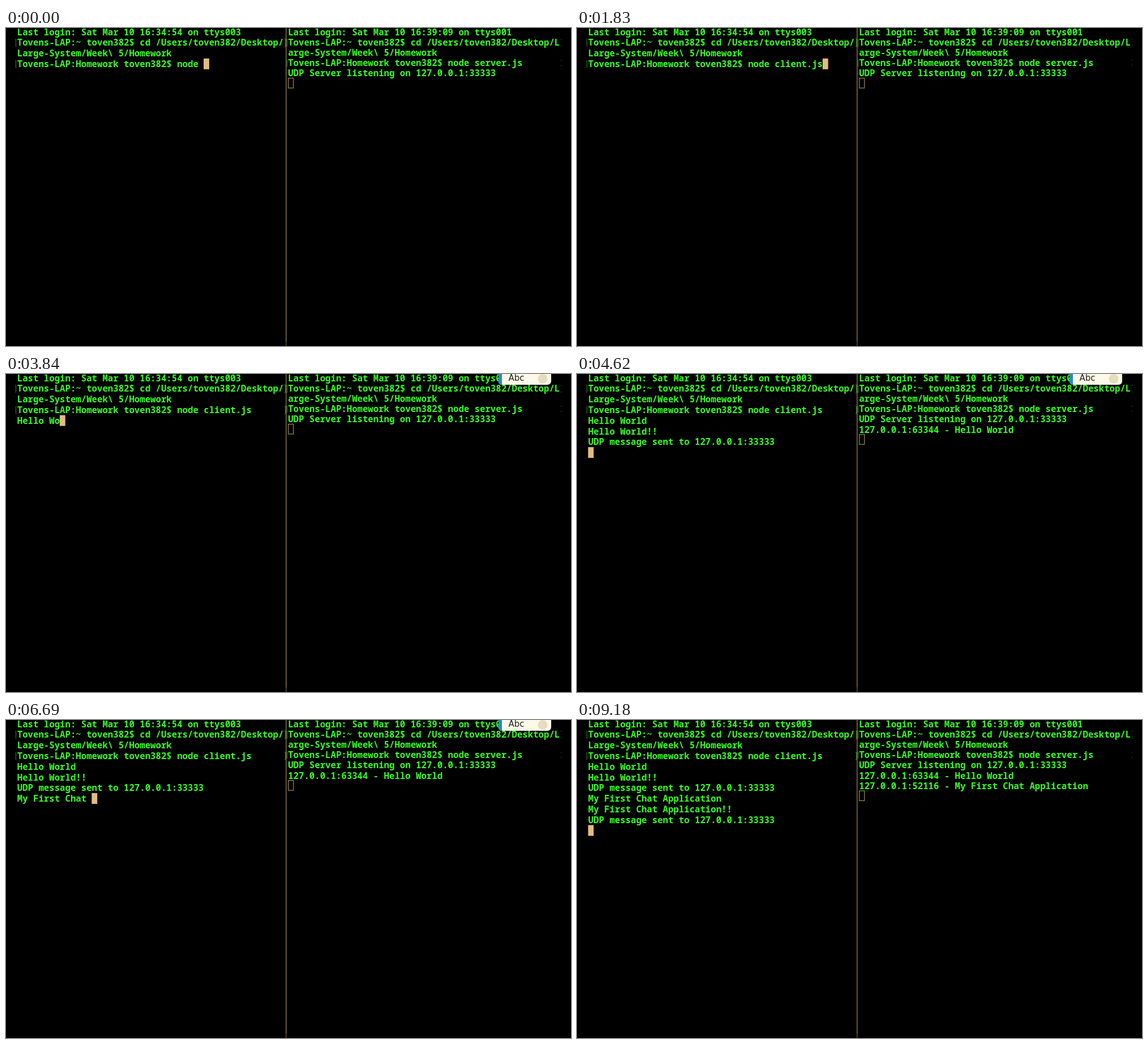
An HTML page for the animation above (9210 ms loop, 998 by 561 pixels).

```html
<!DOCTYPE html>
<html lang="en">
<head>
<meta charset="utf-8">
<title>UDP chat in two terminals</title>
<style>
  html, body { margin: 0; width: 100%; height: 100%; overflow: hidden; background: #000; }
  svg { display: block; width: 998px; height: 561px; }
  text { white-space: pre; }
  .term { font: 600 15.69px "Noto Sans Mono", "DejaVu Sans Mono", monospace; fill: #35ff22; font-variant-ligatures: none; }
  .mark { fill: none; stroke: #2b8a20; stroke-width: 1; }
  .dim { stroke: #174d12; }
</style>
</head>
<body>
<svg viewBox="0 0 998 561">
  <rect width="998" height="561" fill="#000"/>
  <rect x="494" width="1.5" height="553" fill="#86733f"/>
  <rect x="494" y="553" width="1.5" height="8" fill="#5a4c2a"/>

  <!-- prompt marks -->
  <path class="mark" d="M17.5 19V33M17.5 57V70M491.5 19H493.5V33H491.5M496.5 19V33M496.5 56V68"/>
  <path class="mark" id="enterMark" d="M491.5 57H493.5V70H491.5"/>
  <path class="mark dim" d="M980.5 19V21M980.5 31V33M980.5 56V58M980.5 65V67"/>

  <g class="term" id="left"></g>
  <g class="term" id="right"></g>
  <rect id="block" width="9.8" height="19" fill="#e2bd7f"/>
  <rect id="hollow" x="498.6" width="9" height="17.4" fill="none" stroke="#a08a52" stroke-width="1.2"/>

  <g id="badge">
    <path d="M870 0H963V12Q963 19 956 19H876Q870 19 870 12Z" fill="#fdf9e8"/>
    <path d="M870 0H876V19Q870 19 870 12Z" fill="#2f86cf"/>
    <text x="887.5" y="11.6" fill="#222" style="font: 15px 'DejaVu Sans', sans-serif">Abc</text>
    <circle cx="948" cy="8.5" r="8.5" fill="#e6dcc0"/>
  </g>

  <path id="pointer" fill="#111" stroke="#f5e9c6" stroke-width="1.2" stroke-linejoin="round"
    d="M811.5 206V217.4L813.9 215.3L815.6 219L817.5 218.2L815.9 214.7H818.4Z"/>
</svg>
<script>
const LOOP = 9210, CHAR = 9.414;
const ENTER = { command: 1900, hello: 4440, chat: 8430 };
const $ = id => document.getElementById(id);

const host = "Tovens-LAP", user = "toven382";
const cd = `${host}:~ ${user}$ cd /Users/${user}/Desktop/`;
const prompt = `${host}:Homework ${user}$ node `;
const sent = "UDP message sent to 127.0.0.1:33333";

const makePane = (id, x, pitch) => {
  const rows = Array.from({ length: 11 }, (_, i) => {
    const row = document.createElementNS("http://www.w3.org/2000/svg", "text");
    row.setAttribute("x", x);
    row.setAttribute("y", 12.6 + pitch * i);
    return $(id).appendChild(row);
  });
  return lines => rows.forEach((row, i) => {
    const s = lines[i] || "";
    if (row.textContent !== s) row.textContent = s;
  });
};
const showLeft = makePane("left", 19.8, 18.8);
const showRight = makePane("right", 498.2, 18.2);

const typed = (text, t, start, step) =>
  text.slice(0, Math.max(0, Math.floor((t - start) / step) + 1));

const fileName = t => {
  if (t < 1140) return typed("client.h", t, 90, 110);
  return "client." + typed("js", t, 1380, 130);
};

const show = (id, on) => $(id).setAttribute("visibility", on ? "visible" : "hidden");

function draw(t) {
  const left = [
    "Last login: Sat Mar 10 16:34:54 on ttys003",
    cd, "Large-System/Week\\ 5/Homework", prompt + fileName(t)
  ];
  const right = [
    "Last login: Sat Mar 10 16:39:09 on ttys001",
    cd + "L", "arge-System/Week\\ 5/Homework", prompt + "server.js",
    "UDP Server listening on 127.0.0.1:33333"
  ];
  if (t >= ENTER.command) left.push(typed("Hello World", t, 2960, 115));
  if (t >= ENTER.hello) {
    left.push("Hello World!!", sent, typed("My First Chat Application", t, 5130, 118));
    right.push("127.0.0.1:63344 - Hello World");
  }
  if (t >= ENTER.chat) {
    left.push("My First Chat Application!!", sent, "");
    right.push("127.0.0.1:52116 - My First Chat Application");
  }
  showLeft(left);
  showRight(right);

  const row = left.length - 1;
  $("block").setAttribute("x", 19.6 + CHAR * left[row].length);
  $("block").setAttribute("y", -2.6 + 18.8 * row);
  $("hollow").setAttribute("y", -2.5 + 18.2 * right.length);

  show("enterMark", t >= ENTER.command);
  show("pointer", t >= 2300 && t < 2940);
  show("badge", t >= 2940 && t < 8800);
}

const begin = performance.now();
function tick(now) {
  draw(Math.max(0, now - begin) % LOOP);
  requestAnimationFrame(tick);
}
draw(0);
requestAnimationFrame(tick);
</script>
</body>
</html>
```
